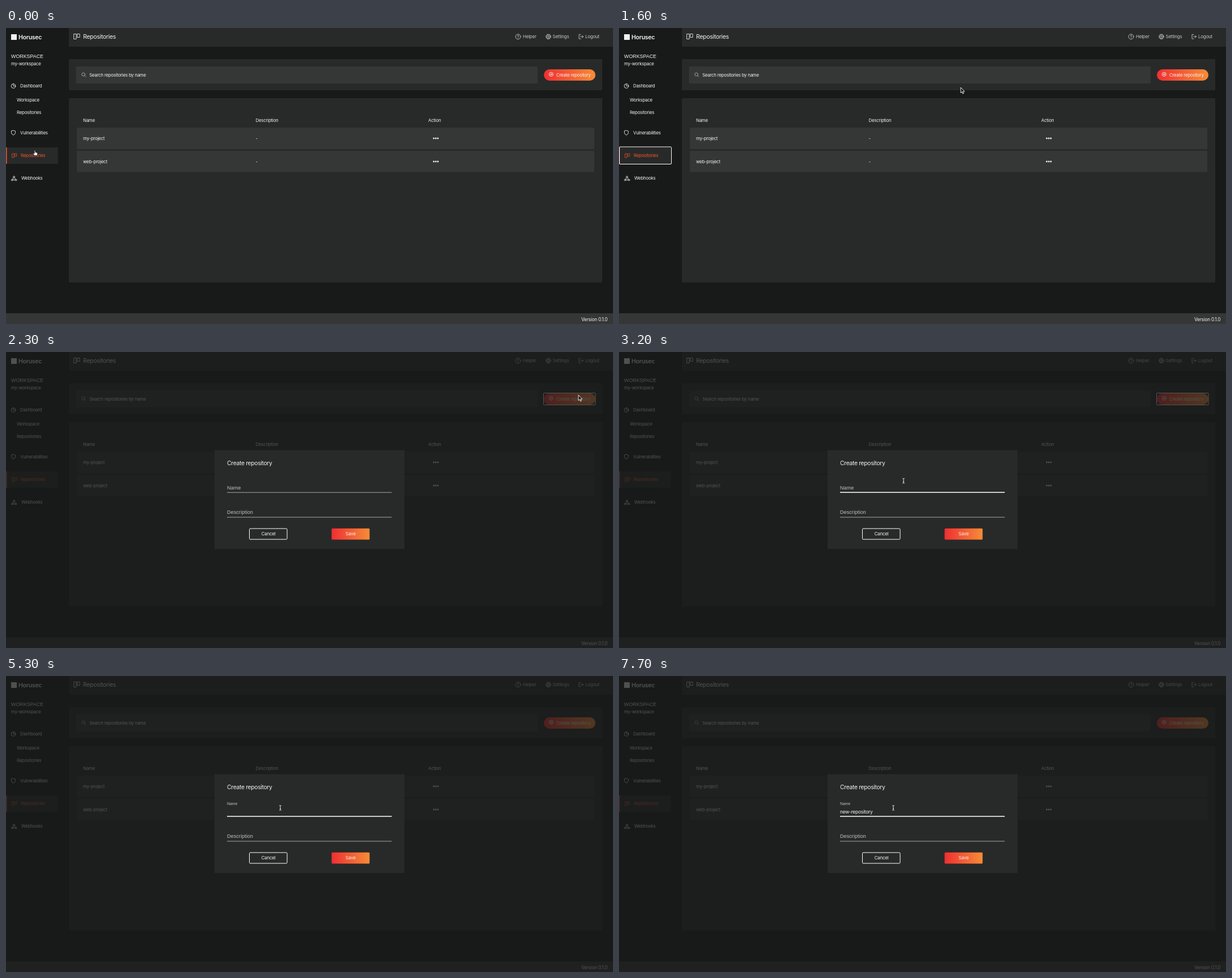
These frames come from a looping animation (1071 px wide and 523 px high, 8 s). An HTML page:

```html
<!DOCTYPE html>
<html lang="en">
<head>
<meta charset="utf-8">
<title>Create repository</title>
<style>
  html, body { margin: 0; width: 100%; height: 100%; overflow: hidden; background: #181a19; }
  svg { display: block; width: 1071px; height: 523px; }
  text { font: 7.85px Inter, sans-serif; letter-spacing: -.029em; fill: #f2f2f2; }
  .title { font-size: 10.5px; }
  .brand { font-size: 10.6px; font-weight: 600; }
  .caps { font: 8.9px "Liberation Sans", Arial, sans-serif; letter-spacing: 0; }
  .top text { font-size: 8px; fill: #c4c5c5; }
  .field { font: 9px "Liberation Sans", Arial, sans-serif; letter-spacing: .009em; fill: #c0c1c1; }
  .typed { font-size: 8.45px; }
  .mid { font-size: 8.1px; text-anchor: middle; }
  .panel { fill: #282a29; }
  .raised { fill: #353736; }
  .icon { fill: none; stroke: #e8e8e8; stroke-width: .9; stroke-linejoin: round; stroke-linecap: round; }
  .top .icon { stroke: #c4c5c5; }
  .ring { fill: none; stroke: #fff; }
</style>
</head>
<body>
<svg viewBox="0 0 1071 523">
  <defs>
    <linearGradient id="fire"><stop stop-color="#ef2f32"/><stop offset="1" stop-color="#f78c37"/></linearGradient>
    <path id="board" d="M0 0h4v9h-4zM6 0h4v6h-4z"/>
    <g id="dots" fill="#f2f2f2"><circle r="1.4"/><circle cx="3.6" r="1.4"/><circle cx="7.2" r="1.4"/></g>
  </defs>

  <rect class="panel" x="111" width="960" height="33"/>
  <rect class="panel" x="111" y="55" width="941" height="55" rx="1"/>
  <rect class="panel" x="111" y="124" width="941" height="325.5" rx="1"/>
  <rect class="raised" x="123.5" y="68" width="814.5" height="30" rx="1.5"/>
  <rect class="raised" x="125" y="176" width="913" height="38" rx="1.5"/>
  <rect class="raised" x="125" y="217" width="913" height="37.5" rx="1.5"/>
  <rect class="raised" y="504" width="1071" height="19"/>

  <rect x="9" y="11" width="10" height="10" fill="#f2f2f2"/>
  <text class="brand" x="22" y="20">Horusec</text>
  <text class="caps" x="9" y="53.3">WORKSPACE</text>
  <text x="9" y="66">my-workspace</text>

  <g class="icon">
    <circle cx="13" cy="102.5" r="3.8"/><path d="M13 98.7v3.8h3.8"/>
    <path d="M13 181l3.5 1.2v2.6q0 3-3.5 4.4q-3.500-1.400-3.500-4.400v-2.600z"/>
    <circle cx="14" cy="263.300" r="1.500"/><circle cx="10.800" cy="268.500" r="1.400"/><circle cx="17.400" cy="268.500" r="1.400"/>
    <path d="M13.300 264.700l-1.700 2.700M14.800 264.700l1.800 2.700M12.200 268.500h3.800"/>
  </g>
  <text x="25" y="105">Dashboard</text>
  <text x="19" y="130.200">Workspace</text>
  <text x="19" y="151.500">Repositories</text>
  <text x="25" y="187.700">Vulnerabilities</text>
  <rect class="panel" y="211" width="91.500" height="29"/>
  <rect y="211" width="1.500" height="29" fill="#f2552f"/>
  <use href="#board" class="icon" transform="translate(11 222) scale(.78)" style="stroke:#f2552f"/>
  <text x="26" y="228" style="fill:#f2552f">Repositories</text>
  <text x="27" y="268.300">Webhooks</text>
  <rect id="menuRing" class="ring" x=".5" y="210" width="92" height="30.500" rx="1.500"/>

  <use href="#board" class="icon" x="120" y="10.500"/>
  <text class="title" x="136" y="19">Repositories</text>
  <g class="top">
    <g class="icon">
      <circle cx="903.500" cy="15.300" r="4.500"/><path d="M902.200 14.200q.2-1.400 1.400-1.400t1.300 1.300q0 .8-1.300 1.500v.5M903.600 17.700v.1"/>
      <circle cx="957" cy="15.300" r="1.500"/>
      <circle cx="957" cy="15.300" r="3.500"/><circle cx="957" cy="15.300" r="4.300" stroke-dasharray="1.700 1.677"/>
      <path d="M1014 11.500h-3v7.600h3M1013.500 15.300h5M1016.600 13.200l2 2.100l-2 2.100"/>
    </g>
    <text x="912" y="18.200">Helper</text>
    <text x="964.500" y="18.200">Settings</text>
    <text x="1022" y="18.200">Logout</text>
  </g>

  <g class="icon" style="stroke:#aaabab"><circle cx="136.500" cy="82" r="2.800"/><path d="M138.600 84.200l2.200 2.200"/></g>
  <text x="147" y="85.700">Search repositories by name</text>
  <g id="create">
    <rect x="949" y="73" width="91" height="20" rx="10" fill="url(#fire)"/>
    <g class="icon" stroke-width=".8"><circle cx="961.800" cy="81.800" r="3.600"/><path d="M960 81.800h3.600M961.800 80v3.600"/></g>
    <text x="971" y="85.700">Create repository</text>
    <rect id="createRing" class="ring" x="948.500" y="72.500" width="91.500" height="21" rx="1"/>
  </g>

  <text x="136" y="165.500">Name</text>
  <text x="440.500" y="165.500">Description</text>
  <text x="745" y="165.500">Action</text>
  <text x="136" y="198">my-project</text><text x="440.500" y="198">-</text><use href="#dots" x="754.800" y="195"/>
  <text x="136" y="238.800">web-project</text><text x="440.500" y="238.800">-</text><use href="#dots" x="754.800" y="236"/>
  <text x="1015" y="518" style="font-size:8.3px">Version 0.1.0</text>

  <g id="modal">
    <rect width="1071" height="523" fill="#181a19" opacity=".74"/>
    <rect class="panel" x="368" y="173.500" width="335" height="174.500"/>
    <text class="title" x="390" y="200" style="font-size:10.300px">Create repository</text>
    <text id="label" class="field">Name</text>
    <text id="typed" class="typed" x="390" y="242.500"></text>
    <rect id="caret" y="234.500" width="1" height="10" fill="#fff"/>
    <rect x="390" y="247.700" width="290.500" height=".9" fill="#b4b5b5"/>
    <rect id="line" y="247.300" height="1.300" fill="#fff"/>
    <text class="field" x="390" y="286.200">Description</text>
    <rect x="390" y="291.500" width="290.500" height=".9" fill="#b4b5b5"/>
    <rect class="ring" x="429.500" y="312" width="66.500" height="19" rx="1.500"/>
    <text class="mid" x="463" y="324.200">Cancel</text>
    <rect x="574.500" y="311.700" width="67" height="19.800" rx="1.500" fill="url(#fire)"/>
    <text class="mid" x="608" y="324.200">Save</text>
  </g>

  <g id="pointer">
    <path id="arrow" d="M0 0v9.700l2.200-2l1.500 3.400l1.500-.7l-1.500-3.300h3z" fill="#111" stroke="#fff" stroke-width=".9"/>
    <path id="hand" d="M-.9 .6q.9-1.200 1.700 0v3l2.700.6q1.400.4 1.200 1.800l-.7 3.300h-4.700l-2.500-3.300q.1-1.300 1.300-.7l1 .8z" fill="#fff" stroke="#111" stroke-width=".7"/>
    <path id="beam" d="M-1.800-4.300q1.800 0 1.800 1v6.600q0 1-1.800 1M1.800-4.300q-1.800 0-1.800 1M1.800 4.300q-1.800 0-1.800-1M-1 1.500h2" fill="none" stroke="#e8e8e8" stroke-width="1"/>
  </g>
</svg>
<script>
const LOOP = 8000, STEP = 100;
const $ = id => document.getElementById(id);
const show = (id, on) => $(id).style.display = on ? '' : 'none';
const clamp = v => Math.max(0, Math.min(1, v));
const smooth = v => v * v * (3 - 2 * v);
const mix = (a, b, k) => a + (b - a) * k;

// time, x, y
const path = [[0, 51, 216], [1100, 51, 216], [1200, 92, 190], [1300, 176, 147], [1400, 176, 147],
  [1500, 330, 132], [1600, 603, 105], [1700, 870, 86], [1800, 1012, 76], [2200, 1012, 76],
  [2300, 1010, 76], [2400, 1010, 76], [3300, 484, 233], [LOOP, 484, 233]];
// time, number of letters typed
const keys = [[5700, 1], [5800, 3], [5900, 4], [6500, 8], [6600, 9], [6700, 10], [6900, 11], [7000, 12], [7100, 14]];
// times at which the caret turns on or off
const blinks = [3500, 4100, 4700, 5300, 5700, 6300, 6500, 7700];

function place(t) {
  const i = path.findIndex(p => p[0] > t);
  const [t0, x0, y0] = path[i - 1], [t1, x1, y1] = path[i];
  const k = smooth((t - t0) / (t1 - t0));
  return [mix(x0, x1, k), mix(y0, y1, k)];
}

function draw(t) {
  const [x, y] = place(t);
  const inField = t >= 2500 && x < 680 && y > 222;
  const onLink = t < 1200 || (t >= 1800 && t < 2300);
  $('pointer').setAttribute('transform', `translate(${x} ${y})`);
  show('beam', inField);
  show('hand', onLink);
  show('arrow', !inField && !onLink);

  show('menuRing', t >= 500 && t < 2000);
  $('menuRing').style.opacity = t < 600 ? .6 : 1;
  show('createRing', t >= 2000 && t < 3400);
  const grow = t >= 1800 && t < 2300 ? 1.025 : 1;
  $('create').setAttribute('transform', `translate(994.5 83) scale(${grow}) translate(-994.5 -83)`);
  show('modal', t >= 2300);

  const lift = smooth(clamp((t - 3300) / 300));
  $('label').setAttribute('transform', `translate(390 ${mix(242.6, 228, lift)}) scale(${mix(1, .75, lift)})`);
  const span = inField ? 290.5 : 0;
  $('line').setAttribute('x', 535.25 - span / 2);
  $('line').setAttribute('width', span);

  const count = keys.reduce((n, [at, letters]) => t >= at ? letters : n, 0);
  $('typed').textContent = 'new-repository'.slice(0, count);
  show('caret', blinks.filter(at => t >= at).length % 2);
  $('caret').setAttribute('x', 390 + (count && t >= 2300 ? $('typed').getComputedTextLength() : 0));
}

function tick() {
  const t = performance.now() % LOOP;
  draw(Math.floor(t / STEP) * STEP);
  requestAnimationFrame(tick);
}
tick();
</script>
</body>
</html>
```
